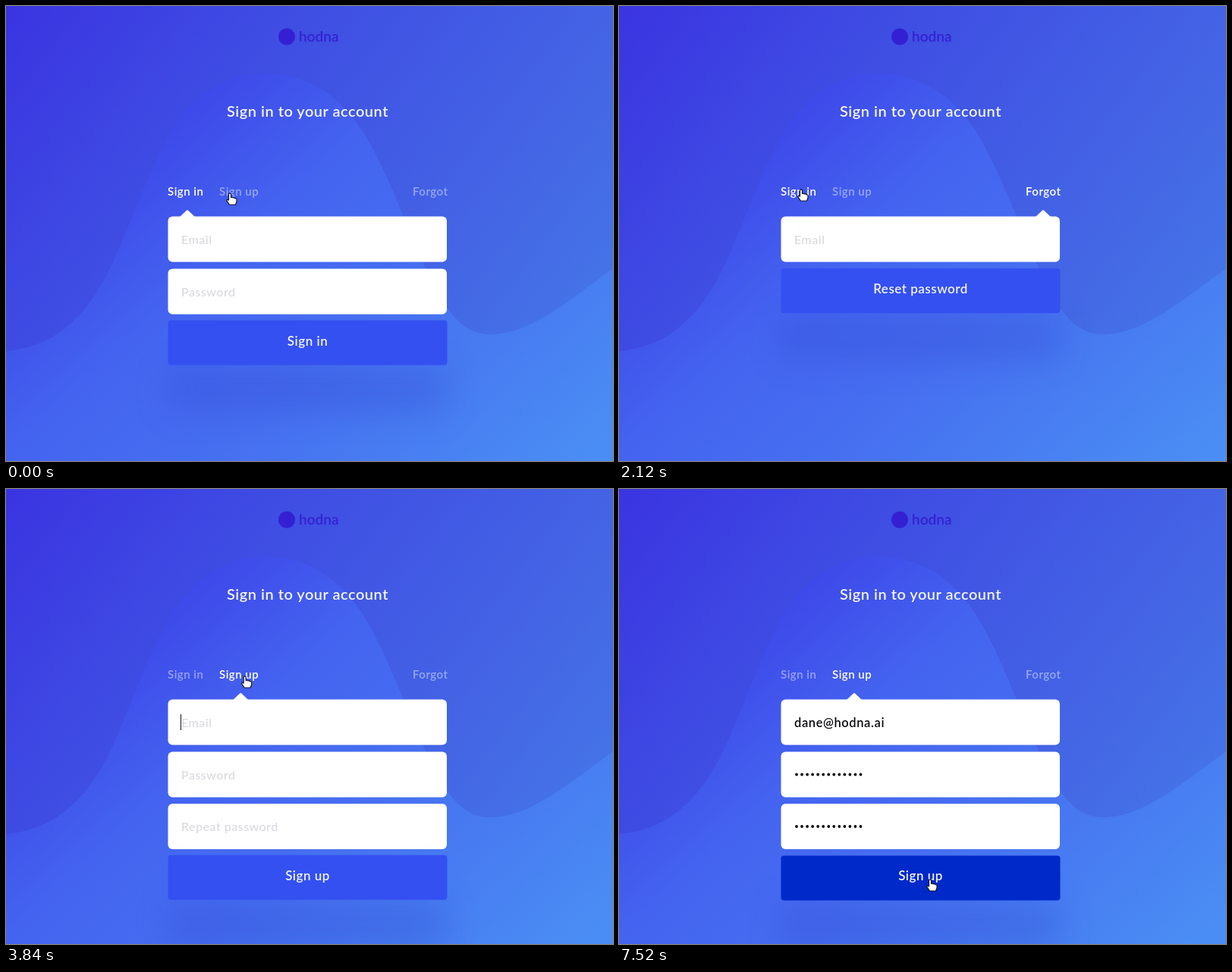
Animation of 800 by 600 pixels, one loop 7.56 s. Source, as an HTML page:

```html
<!DOCTYPE html>
<html lang="en">
<head>
<meta charset="utf-8">
<title>Sign in form</title>
<style>
  html, body { margin: 0; width: 100%; height: 100%; overflow: hidden; background: #4055ea; }
  svg { display: block; width: 100vw; height: 100vh; }
  text { font-family: Lato, "Open Sans", sans-serif; font-weight: 600; letter-spacing: .5px; white-space: pre; }
  .title { font-size: 20px; fill: #f4f5ff; }
  .tab { font-size: 15px; fill: #fff; }
  .hint { font-size: 16px; fill: #d9d9de; font-weight: 500; }
  .label { font-size: 17px; fill: #f2f4ff; }
  .brand { font-size: 19px; fill: #3420d2; letter-spacing: 0; }
  .typed { font-size: 16.5px; fill: #0b0b10; letter-spacing: .6px; }
</style>
</head>
<body>
<svg viewBox="0 0 800 600">
  <defs>
    <linearGradient id="sky" gradientUnits="userSpaceOnUse" x1="0" y1="0" x2="800" y2="600">
      <stop offset="0" stop-color="#3a34e1"/>
      <stop offset=".26" stop-color="#3e4ae3"/>
      <stop offset=".68" stop-color="#4466e5"/>
      <stop offset="1" stop-color="#457fe9"/>
    </linearGradient>
    <linearGradient id="hill" gradientUnits="userSpaceOnUse" x1="150" y1="50" x2="700" y2="650">
      <stop offset=".15" stop-color="#3e49e9"/>
      <stop offset=".37" stop-color="#4464f0"/>
      <stop offset=".6" stop-color="#466ff0"/>
      <stop offset="1" stop-color="#4a8df4"/>
    </linearGradient>
    <filter id="blur" x="-30%" y="-150%" width="160%" height="400%">
      <feGaussianBlur stdDeviation="22"/>
    </filter>
    <clipPath id="reveal"><rect id="revealBox" x="200" y="260" width="400"/></clipPath>
  </defs>

  <rect width="800" height="600" fill="url(#sky)"/>
  <path fill="url(#hill)" d="M0 455C60 450 105 415 140 340C165 285 185 225 215 170C245 118 290 89 340 89C400 89 440 120 470 165C505 220 530 300 560 360C580 400 600 433 638 433C690 433 740 390 800 346V600H0Z"/>

  <circle cx="370" cy="40.500" r="11" fill="#3420d2"/>
  <text class="brand" x="386" y="47">hodna</text>
  <text class="title" x="397.500" y="146" text-anchor="middle">Sign in to your account</text>

  <g id="tabs"></g>
  <rect id="shadow" x="213.500" width="368" height="59" fill="#2f45d0" opacity=".3" filter="url(#blur)"/>
  <path id="pointer" d="M-10 9L-1 .5Q0 -.5 1 .5L10 9Z" fill="#fff"/>
  <g id="fields" clip-path="url(#reveal)"></g>
  <rect id="button" x="213.500" width="368" height="59" rx="4"/>
  <g id="labels"></g>
  <text id="email" class="typed" x="231" y="314"></text>
  <path id="dots" fill="none" stroke="#0b0b10" stroke-width="3.800" stroke-linecap="round"/>
  <rect id="caret" x="230" width="1" height="21" fill="#111"/>

  <g id="cursor">
    <path id="arrow" d="M0 0V13.500L3.100 10.700L5.200 15.300L7.600 14.200L5.500 9.800H9.700Z" fill="#0c0c12" stroke="#fff" stroke-width="1"/>
    <path id="hand" d="M-1.500 .8Q0 -1 1.500 .8V5.500Q3 4.500 4.200 6Q5.800 5.200 6.700 6.700Q9 6.200 9 8.500V11L7.500 15H-.5L-4 9.800Q-4.500 7.300-1.500 9Z" fill="#fff" stroke="#15151f" stroke-width="1.200" stroke-linejoin="round"/>
  </g>
</svg>
<script>
const LOOP = 7560, STEP = 40, SLIDE = 700;
const EMAIL = "dane@hodna.ai", SECRET = 13;
const $ = id => document.getElementById(id);
const clamp = (v, lo = 0, hi = 1) => Math.min(hi, Math.max(lo, v));
const mix = (a, b, p) => a + (b - a) * p;
const ramp = (t, from, to) => clamp((t - from) / (to - from));
const ease = u => u < .5 ? 4 * u ** 3 : 1 - 4 * (1 - u) ** 3;
const set = (el, attrs) => { for (const k in attrs) el.setAttribute(k, attrs[k]); };

function add(parent, tag, attrs, text = "") {
  const el = document.createElementNS("http://www.w3.org/2000/svg", tag);
  set(el, attrs);
  el.textContent = text;
  return parent.appendChild(el);
}

// hovers: [rise start, rise end, release]
const modes = [
  { name: "Sign in", x: 213, right: 261, tip: 239, top: 414.5, action: "Sign in", base: 447.5, hovers: [[1880, 2040, 2813]] },
  { name: "Sign up", x: 281, right: 334, tip: 310, top: 483.5, action: "Sign up", base: 516, hovers: [[0, 160, 876], [2420, 2560, 3940]] },
  { name: "Forgot", x: 536, right: 582, tip: 559, top: 346, action: "Reset password", base: 379, hovers: [[600, 760, 1846]] }
];
// [click time, mode left, mode entered]
const clicks = [[176, 0, 1], [1146, 1, 2], [2113, 2, 0], [3236, 0, 1]];
// [time, x, y] of the cursor tip
const path = [
  [0, 295, 247], [240, 297, 247], [640, 549, 238], [1180, 551, 241], [1520, 269, 217],
  [1920, 240, 242], [2200, 240, 242], [2540, 314, 247], [4620, 315, 247],
  [6640, 315, 247], [7040, 408, 512], [7300, 410, 515]
];

for (const m of modes) {
  m.tab = add($("tabs"), "text", { class: "tab", x: m.x, y: 250 }, m.name);
  m.label = add($("labels"), "text", { class: "label", x: 397.5, "text-anchor": "middle" }, m.action);
}
const fields = [["Email", 277.5], ["Password", 346.5], ["Repeat password", 415]].map(([hint, y]) => {
  const group = add($("fields"), "g", {});
  add(group, "rect", { x: 213.5, y, width: 367.5, height: 60, rx: 6, fill: "#fff" });
  return { group, hint: add(group, "text", { class: "hint", x: 231, y: y + 36.3 }, hint) };
});

function slideAt(t) {
  let slide = { from: 0, to: 0, p: 1 };
  for (const [start, from, to] of clicks)
    if (t >= start) slide = { from, to, p: ease(ramp(t, start, start + SLIDE)) };
  return slide;
}

function cursorAt(t) {
  const i = path.findIndex(k => k[0] > t);
  if (i < 0) return path[path.length - 1].slice(1);
  const [a, b] = [path[i - 1], path[i]];
  const u = ramp(t, a[0], b[0]), p = u * u * (3 - 2 * u);
  return [mix(a[1], b[1], p), mix(a[2], b[2], p)];
}

function drawTabs(t, { from, to, p }, top) {
  modes.forEach((m, i) => {
    const active = i === to ? p : i === from ? 1 - p : 0;
    const hover = Math.max(...m.hovers.map(([a, b, end]) => t < end ? ramp(t, a, b) : 0));
    m.tab.setAttribute("opacity", mix(.45, 1, Math.max(active, hover)));
    set(m.label, {
      y: clamp(m.base, top + 25.5, top + 42.5),
      opacity: clamp((34 - Math.abs(top - m.top)) / 8)
    });
  });
}

function drawTyping(t) {
  const typed = (from, to, total) => Math.floor(ramp(t, from, to) * total);
  const email = typed(3940, 4640, EMAIL.length);
  const counts = [typed(4940, 5680, SECRET), typed(6000, 6620, SECRET)];
  const dotX = n => 234 + n * 7.04;

  $("email").textContent = EMAIL.slice(0, email);
  let d = "";
  counts.forEach((count, row) => {
    for (let n = 0; n < count; n++) d += `M${dotX(n)} ${376.5 + row * 68.5}h.01`;
  });
  $("dots").setAttribute("d", d);
  [email, ...counts].forEach((n, i) => fields[i].hint.setAttribute("opacity", n ? 0 : 1));

  const row = t < 4720 ? 0 : t < 5800 ? 1 : 2;
  const end = row ? counts[row - 1] * 7.04 : email && $("email").getComputedTextLength();
  set($("caret"), {
    x: 230 + Math.round(end),
    y: 297 + row * 68.5,
    opacity: t >= 3840 && t < 7120 ? 1 : 0
  });
}

function drawCursor(t) {
  const [x, y] = cursorAt(t);
  const overTab = y > 233 && y < 259 && modes.some(m => x >= m.x && x <= m.right);
  const hand = overTab || y > 484;
  set($("cursor"), { transform: `translate(${x} ${y})`, opacity: t >= 4620 && t < 6640 ? 0 : 1 });
  $("hand").setAttribute("opacity", hand ? 1 : 0);
  $("arrow").setAttribute("opacity", hand ? 0 : 1);
}

function render(t) {
  const slide = slideAt(t);
  const between = key => mix(modes[slide.from][key], modes[slide.to][key], slide.p);
  const top = between("top");
  const hover = ramp(t, 6960, 7240);

  $("pointer").setAttribute("transform", `translate(${between("tip")} 269)`);
  set($("button"), { y: top, fill: `rgb(${mix(52, 0, hover)},${mix(80, 41, hover)},${mix(241, 201, hover)})` });
  $("shadow").setAttribute("y", top + 62);
  $("revealBox").setAttribute("height", top + 3 - 260);
  fields[2].group.setAttribute("opacity", top > 415 ? 1 : 0);
  drawTabs(t, slide, top);
  drawTyping(t);
  drawCursor(t);
}

const began = performance.now();
function tick() {
  const t = (performance.now() - began) % LOOP;
  render(Math.floor(t / STEP) * STEP);
  requestAnimationFrame(tick);
}
tick();
</script>
</body>
</html>
```
